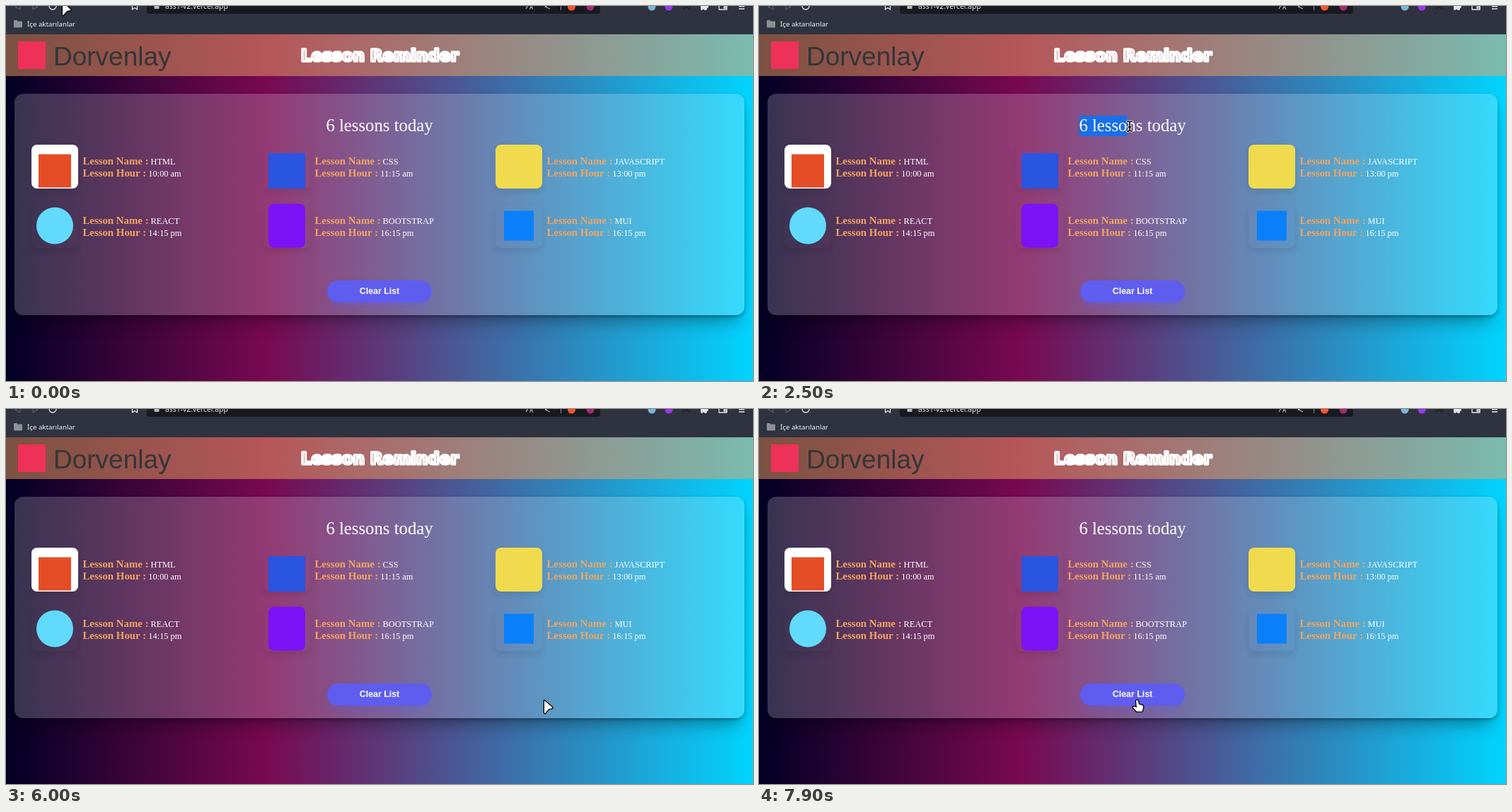
These frames come from a looping animation (1056x530 px, 8000 ms). An HTML page with a canvas:

```html
<!DOCTYPE html>
<html lang="en">
<head>
<meta charset="utf-8">
<title>Lesson Reminder</title>
<style>
  html, body { margin: 0; width: 100%; height: 100%; overflow: hidden; }
  #stage {
    position: relative; width: 1056px; height: 530px; overflow: hidden;
    background: linear-gradient(90deg, rgb(2,0,36) 0%, rgb(121,9,81) 35%, rgb(0,212,255) 100%);
  }
  #stage > * { position: absolute; }
  .chrome { left: 0; top: 0; width: 1056px; height: 40px; background: #2f3340; }
  .header { left: 0; top: 40px; width: 1056px; height: 59px; background: rgba(244,164,96,.5); }
  .card {
    left: 12px; top: 124px; width: 1032px; height: 313px; border-radius: 12px;
    background: rgba(255,255,255,.2);
    box-shadow: 0 2px 4px rgba(0,0,0,.3), 0 16px 24px -8px rgba(0,0,0,.35);
  }
  .tile { width: 66px; height: 62px; border-radius: 8px; box-shadow: 0 5px 10px rgba(0,0,0,.09); }
  .button {
    left: 454px; top: 388px; width: 148px; height: 31px; border-radius: 16px;
    background: #5e5df0; box-shadow: 0 8px 16px -5px rgba(94,93,240,.45);
  }
  canvas { left: 0; top: 0; }
</style>
</head>
<body>
<div id="stage">
  <div class="chrome"></div>
  <div class="header"></div>
  <div class="card"></div>
  <div class="button"></div>
  <canvas id="view" width="1056" height="530"></canvas>
</div>
<script>
const LOOP = 8000, STEP = 100;
const SERIF = '"Liberation Serif", serif';
const SANS = '"Liberation Sans", sans-serif';
const UI = '"Noto Sans", sans-serif';
const TITLE = { text: '6 lessons today', font: '24.75px ' + SERIF, x: 452.4, y: 177 };

const view = document.getElementById('view');
const ctx = view.getContext('2d');

const lessons = [
  { name: 'HTML', hour: '10:00 am', color: '#e44d26', w: 46, h: 47, dy: 6, tile: '#fff' },
  { name: 'CSS', hour: '11:15 am', color: '#2a55e0', w: 52, h: 50, dy: 6 },
  { name: 'JAVASCRIPT', hour: '13:00 pm', color: '#f0db4f', w: 66, h: 62, r: 8 },
  { name: 'REACT', hour: '14:15 pm', color: '#61dafb', w: 52, h: 52, r: 26 },
  { name: 'BOOTSTRAP', hour: '16:15 pm', color: '#7c12f6', w: 52, h: 62, r: 8 },
  { name: 'MUI', hour: '16:15 pm', color: '#0a80fa', w: 42, h: 42 }
];
lessons.forEach((l, i) => {
  l.x = 36 + (i % 3) * 328;
  l.y = 196 + Math.floor(i / 3) * 83.5;
  const tile = document.createElement('div');
  tile.className = 'tile';
  tile.style.cssText = `left:${l.x}px;top:${l.y}px;background:${l.tile || 'none'}`;
  view.before(tile);
});

// Pointer path: time, x, y
const path = [
  [0, 80, -5], [100, 80, -7], [200, 80, -7], [300, 80.5, -5], [400, 81, -2], [800, 81, -2],
  [1000, 180, 24], [1300, 412, 135], [1500, 462, 186], [1700, 481, 204], [1800, 481, 204],
  [2000, 464, 176], [2100, 455, 169], [2200, 455, 169], [2500, 524, 170], [4200, 524, 170],
  [4500, 400, 192], [4800, 160, 178], [5000, 80, 153], [5100, 78, 78], [5200, 77, 72],
  [5500, 330, 240], [5800, 650, 400], [6000, 761, 412], [6300, 530, 413], [6400, 493, 409],
  [6500, 482, 408], [6600, 490, 407], [6700, 513, 405], [7400, 513, 405], [7600, 530, 406],
  [7900, 535, 411.5]
];

const arrow = new Path2D('M0 0 L11.3 9.8 Q11.6 11 10 11.2 Q6.5 11.3 4.7 13.5 L1.5 17.6 Q.2 18.6 0 17 Z');
const hand = new Path2D('M-2 1 Q-.5 -1 1 1 L2 6 L7 7.3 Q8.6 8 8 11 L6.5 16 L-1 16 L-6 10.8 Q-6 8.6 -4 9 L-1 10.5 Z');
const beam = new Path2D('M-3.5 -7 Q0 -7 0 -5 Q0 -7 3.5 -7 M0 -5 V5 M-3.5 7 Q0 7 0 5 Q0 7 3.5 7 M-2 1 H2');

function text(str, x, y, font, color) {
  ctx.font = font;
  ctx.fillStyle = color;
  ctx.fillText(str, x, y);
  return x + ctx.measureText(str).width;
}

function box(x, y, w, h, r, color) {
  ctx.fillStyle = color;
  ctx.beginPath();
  ctx.roundRect(x, y, w, h, r);
  ctx.fill();
}

function dot(x, y, r, color) {
  box(x - r, y - r, 2 * r, 2 * r, r, color);
}

function line(d, color, width = 1.3) {
  ctx.strokeStyle = color;
  ctx.lineWidth = width;
  ctx.stroke(new Path2D(d));
}

function drawChrome() {
  const light = '#e6e6ea', dim = '#686b78';
  line('M20 -3 L13 1 L20 5 Z M38 -3 L45 1 L38 5 Z', dim, 1);
  line('M61 0 A5 5 0 1 0 71 0', light);
  line('M178.5 -3 V5 L182 2.5 L185.5 5 V-3', light);
  box(199, -10, 641, 21, 4, '#181a20');
  box(209.5, -2, 7, 6, 1, '#b9bbc3');
  text('ass1-v2.vercel.app', 225, 4, '10.35px ' + UI, light);
  text('A', 740, 5, '8px ' + UI, light);
  line('M735 -1 H741 M738 -1 L735 4', light, 1);
  line('M769 -2 L762 1 L769 4', '#c8c9cf', 1);
  box(784, -2, 1, 8, 0, '#888a94');
  dot(799.5, 1, 5.5, '#fb542b');
  dot(826, 1, 5.5, '#a52b72');
  dot(913, 1, 5.5, '#7db5dc');
  dot(937, 1, 5.5, '#9b38e8');
  text('(A)', 956, 4, '9px ' + UI, '#14151b');
  box(982, -3, 9, 9, 2, light);
  dot(991, 1, 2, light);
  dot(986, 6, 1.5, '#2f3340');
  line('M1008 -3 V5 H1019 V-2 H1008 M1019 1 H1015 V3 H1019', light);
  line('M1036 0.5 H1044 M1036 4 H1044', light);
  box(11, 20, 5, 4, 1, '#8e9097');
  box(11, 21.5, 12, 9, 1, '#8e9097');
  text('İçe aktarılanlar', 30, 29, '9.7px ' + UI, '#f2f2f4');
}

function drawHeader() {
  box(17, 50, 39, 39, 0, '#ee3158');
  text('Dorvenlay', 67, 84, '37px ' + SANS, '#343638');
  // Hollow lettering: a thick outline leaves a thin slit in each stem
  ctx.font = 'bold 23px "DejaVu Sans", sans-serif';
  ctx.lineJoin = 'round';
  ctx.strokeStyle = '#fff';
  ctx.lineWidth = 3.7;
  ctx.strokeText('Lesson Reminder', 417, 77.5);
}

function drawLesson(l) {
  box(l.x + 33 - l.w / 2, l.y + 31 - l.h / 2 + (l.dy || 0), l.w, l.h, l.r || 0, l.color);
  const row = (label, value, y) => {
    const end = text(label, l.x + 72.4, y, 'bold 14.85px ' + SERIF, '#f4a460');
    text(value, end + 3, y, '12.4px ' + SERIF, '#fff');
  };
  row('Lesson Name :', l.name, l.y + 28);
  row('Lesson Hour :', l.hour, l.y + 45);
}

function drawSelection(x) {
  ctx.font = TITLE.font;
  let end = TITLE.x;
  for (let i = 1; i <= TITLE.text.length; i++) {
    const edge = TITLE.x + ctx.measureText(TITLE.text.slice(0, i)).width;
    if (Math.abs(edge - x) < Math.abs(end - x)) end = edge;
  }
  box(TITLE.x, 155, end - TITLE.x, 29, 0, '#1a6fe8');
}

function pointerAt(t) {
  const i = path.findIndex(p => p[0] >= t);
  const [t1, x1, y1] = path[i];
  if (t1 === t) return { x: x1, y: y1 };
  const [t0, x0, y0] = path[i - 1];
  const k = (t - t0) / (t1 - t0);
  return { x: x0 + (x1 - x0) * k, y: y0 + (y1 - y0) * k };
}

function drawPointer({ x, y }) {
  const inside = (l, t, r, b) => x > l && x < r && y > t && y < b;
  ctx.save();
  ctx.translate(x, y);
  ctx.lineJoin = ctx.lineCap = 'round';
  if (inside(449, 155, 606, 184)) {
    ctx.strokeStyle = '#fff';
    ctx.lineWidth = 3.2;
    ctx.stroke(beam);
    ctx.strokeStyle = '#000';
    ctx.lineWidth = 1.6;
    ctx.stroke(beam);
  } else {
    const shape = inside(454, 388, 602, 419) ? hand : arrow;
    ctx.strokeStyle = '#000';
    ctx.lineWidth = 2.6;
    ctx.stroke(shape);
    ctx.fillStyle = '#fff';
    ctx.fill(shape);
  }
  ctx.restore();
}

function draw(now) {
  const t = Math.floor((now % LOOP) / STEP) * STEP;
  const pointer = pointerAt(t);
  ctx.clearRect(0, 0, 1056, 530);
  drawChrome();
  drawHeader();
  if (t > 2200 && t < 4300) drawSelection(pointer.x);
  text(TITLE.text, TITLE.x, TITLE.y, TITLE.font, '#fff');
  lessons.forEach(drawLesson);
  text('Clear List', 499.8, 407, 'bold 12.375px ' + SANS, '#fff');
  drawPointer(pointer);
}

const start = performance.now();
function tick() {
  draw(performance.now() - start);
  requestAnimationFrame(tick);
}
tick();
</script>
</body>
</html>
```
